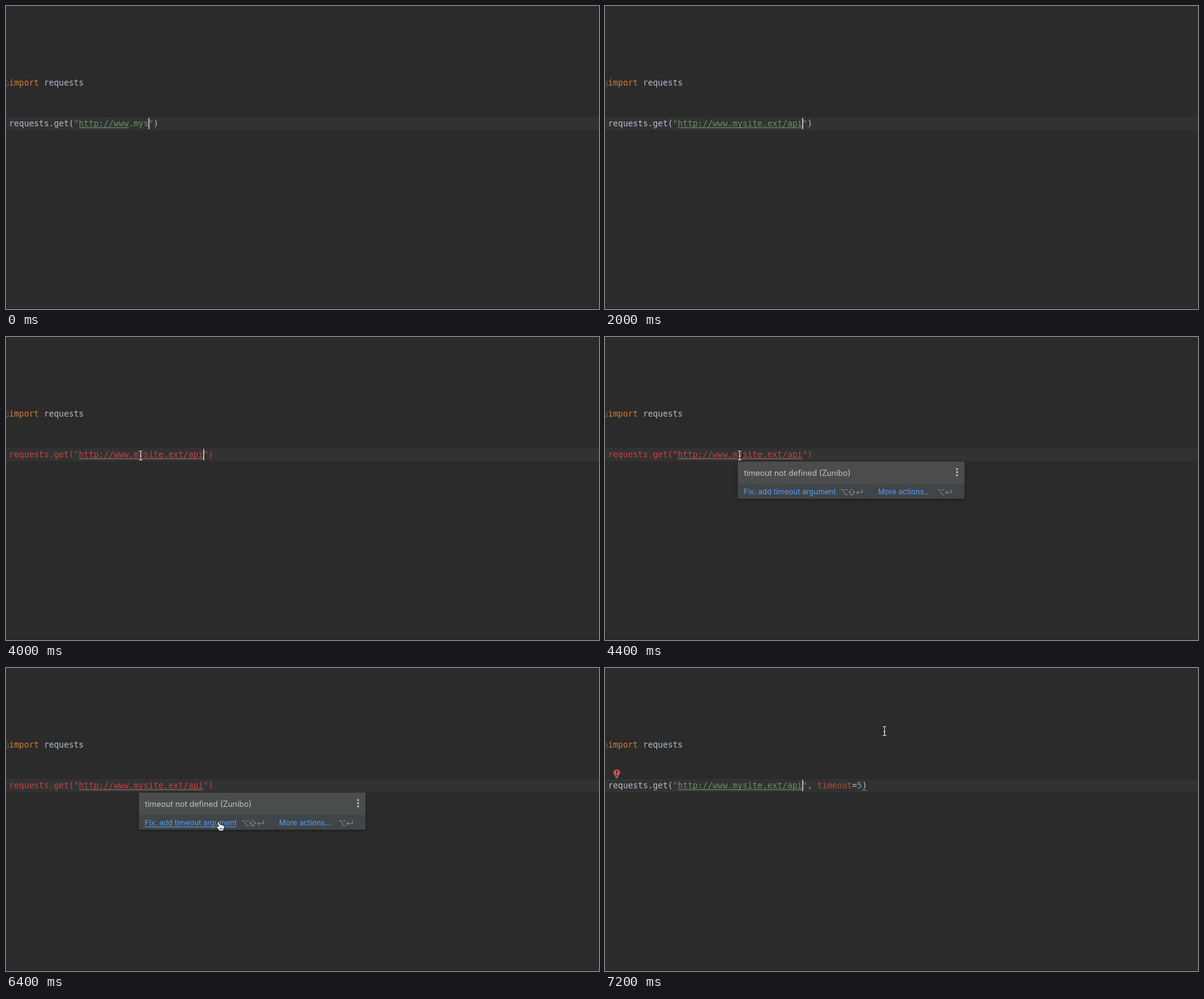
An HTML page for the animation above (7.4 s loop, 960 px wide and 491 px high).

```html
<!DOCTYPE html>
<html lang="en">
<head>
<meta charset="utf-8">
<style>
  html, body { margin: 0; width: 100%; height: 100%; overflow: hidden; background: #2b2b2b; }
  svg { display: block; width: 960px; height: 491px; }
  text { white-space: pre; }
  .code { font: 13.4px "DejaVu Sans Mono", "Noto Sans Mono", monospace; font-variant-ligatures: none; }
  .ui { font-family: Inter, "Open Sans", sans-serif; }
  .link { font-size: 12.08px; fill: #589df6; }
  .keys { fill: none; stroke: #8f9496; stroke-linejoin: round; }
</style>
</head>
<body>
<svg viewBox="0 0 960 491" xmlns="http://www.w3.org/2000/svg">
  <defs>
    <filter id="shade" x="-10%" y="-30%" width="120%" height="170%">
      <feDropShadow dx="0" dy="2" stdDeviation="3" flood-color="#000" flood-opacity=".35"/>
    </filter>
    <path id="option" d="M0 1.5H3L7 9.5H10.5M6.5 1.5H10.5"/>
    <path id="shift" d="M5 .5L10 5.5H7.5V9.5H2.500V5.500H0Z"/>
    <path id="enter" d="M10.5 1V6H1M4 3L1 6L4 9"/>
    <path id="ibeam" d="M-3-7.500Q0-7.500 0-5.500Q0-7.500 3-7.500M0-6V6M-3 7.500Q0 7.500 0 5.500Q0 7.500 3 7.500M-1.800 1H1.800"/>
  </defs>

  <rect width="960" height="491" fill="#2b2b2b"/>
  <rect y="180" width="960" height="21.5" fill="#323232"/>
  <rect y="490" width="960" height="1" fill="#1f2020"/>
  <path d="M0 119.5L3.500 123V129.500H0M0 125.500H1.500" fill="none" stroke="#606366"/>
  <text class="code" x="5" y="129" fill="#afbdcc"><tspan fill="#d07d38">import</tspan> requests</text>

  <text class="code" id="line" x="5" y="195.2"></text>
  <rect id="under" x="118" y="196.6" height="1.1"/>
  <path id="wave" d="M416 199l2-2l2 2l2-2l2 2" fill="none" stroke="#8d9372"/>
  <rect id="caret" y="181.5" width="1.800" height="18" fill="#c0c0c0"/>

  <g id="bulb">
    <path d="M19 164.200a5.300 5.300 0 0 1 3 9.700l-.5 1.300h-5l-.5-1.300a5.300 5.300 0 0 1 3-9.700Z" fill="#d05150"/>
    <path d="M19 166V170.500M19 172V173.800" stroke="#2b2b2b" stroke-width="1.900"/>
    <path d="M16.500 176.300H21.500M17.300 178H20.700" stroke="#9a9da0" stroke-width="1.100"/>
  </g>

  <g id="popup">
    <rect x="215" y="202" width="367" height="60" fill="#4b4d4d" filter="url(#shade)"/>
    <rect x="215" y="238" width="367" height="24" fill="#3f4548"/>
    <text class="ui" x="225" y="224.5" font-size="12.8" fill="#bfc1c2">timeout not defined (Zunibo)</text>
    <g fill="#b4b7b9">
      <circle cx="570" cy="214" r="1.700"/><circle cx="570" cy="219" r="1.700"/><circle cx="570" cy="224" r="1.700"/>
    </g>
    <text class="ui link" x="224.5" y="255">Fix: add timeout argument</text>
    <text class="ui link" x="442" y="255">More actions...</text>
    <rect id="fixLine" x="224.5" y="257" width="148" height="1" fill="#589df6"/>
    <rect id="moreLine" x="442" y="257" width="84" height="1" fill="#589df6"/>
    <g class="keys">
      <use href="#option" x="382.5" y="246"/><use href="#shift" x="394.5" y="246"/><use href="#enter" x="406" y="246"/>
      <use href="#option" x="539" y="246"/><use href="#enter" x="550.5" y="246"/>
    </g>
  </g>

  <g id="mouse">
    <g id="beam" fill="none">
      <use href="#ibeam" stroke="#151515" stroke-width="2.800"/>
      <use href="#ibeam" stroke="#f0f0f0" stroke-width="1.200"/>
    </g>
    <path id="arrow" d="M0 0V14.200L3.300 11.200L5.600 16.500L8 15.500L5.700 10.400H10.200Z" fill="#111" stroke="#fff" stroke-width="1.200" stroke-linejoin="round"/>
    <g id="hand">
      <path d="M-2.500 1Q-2.200-.8-.5 0Q.5.800 2 5Q3.300 4 4.300 5.200Q5.800 4.500 6.600 6Q8.500 5.500 8.900 7.500Q9.300 11 7.500 13V15H0V13.200Q-1.500 11.500-4 8.800Q-4.300 7 -2.500 7.300L-.4 8.500Z" fill="#fff" stroke="#111" stroke-linejoin="round"/>
      <path d="M2 10V13M4 10V13M6 10V13" stroke="#222" stroke-width=".8"/>
    </g>
  </g>
</svg>
<script>
const LOOP = 7400, STEP = 200, CHAR = 8.067, LEFT = 118;
const TYPED = 2200, POPUP = 4400, FIXED = 6600;
const URL_TEXT = "http://www.mysite.ext/api";
const PLAIN = "#afbdcc", GREEN = "#6f8d5e", RED = "#c54340";

// [time, letters typed] and [time, letters underlined]
const typed = [[0, 14], [200, 18], [800, 19], [1000, 21], [1200, 22], [1600, 24], [1800, 25]];
const linked = [[0, 10], [600, 18], [1000, 19], [1200, 21], [1400, 22], [2000, 25]];
// [time, x, y] of the pointer
const path = [
  [3400, 127, 237], [3600, 170, 215], [3800, 208, 196], [4000, 218, 192], [4400, 218, 192],
  [4600, 224, 199], [4800, 310, 228], [5000, 430, 252], [5200, 475, 258], [5400, 461, 256],
  [5800, 385, 252], [6200, 344, 249], [6600, 345, 249], [6800, 356, 236], [7000, 415, 158], [7200, 452.5, 102]
];

const $ = id => document.getElementById(id);
const show = (id, on) => $(id).setAttribute("visibility", on ? "visible" : "hidden");
const latest = (list, t) => list.filter(k => k[0] <= t).pop()[1];

function pointer(t) {
  const i = path.findIndex(k => k[0] > t);
  if (i < 0) return path[path.length - 1].slice(1);
  if (i === 0) return path[0].slice(1);
  const [a, b] = [path[i - 1], path[i]];
  const p = (t - a[0]) / (b[0] - a[0]);
  return [a[1] + (b[1] - a[1]) * p, a[2] + (b[2] - a[2]) * p];
}

function setLine(parts) {
  $("line").replaceChildren(...parts.map(([text, fill]) => {
    const span = document.createElementNS("http://www.w3.org/2000/svg", "tspan");
    span.textContent = text;
    span.setAttribute("fill", fill);
    return span;
  }));
}

// steady around edits, otherwise a half-second blink refreshed every two steps
function caretOn(t) {
  const beat = Math.floor(t / (2 * STEP)) * 2 * STEP;
  return t <= TYPED || t >= FIXED || Math.floor((beat - TYPED) / 500) % 2 === 1;
}

function draw(t) {
  const count = latest(typed, t);
  const bad = t >= 2800 && t < 6800;
  const open = t >= POPUP && t < FIXED;
  const tint = color => bad ? RED : color;

  const parts = [["requests.get(", tint(PLAIN)], ['"' + URL_TEXT.slice(0, count) + '"', tint(GREEN)]];
  if (t >= FIXED) parts.push([", ", tint("#d07d38")], ["timeout", tint("#b64c30")], ["=", tint(PLAIN)], ["5", tint("#6b9cc2")]);
  parts.push([")", tint(PLAIN)]);
  setLine(parts);

  $("under").setAttribute("width", latest(linked, t) * CHAR);
  $("under").setAttribute("fill", bad ? "#a5707c" : "#6b9382");

  show("caret", caretOn(t));
  $("caret").setAttribute("x", LEFT + count * CHAR - .5);
  show("wave", t >= 7000);
  show("bulb", t >= 7000);

  const [x, y] = pointer(t);
  const over = (a, b) => open && x >= a && x <= b && y > 243 && y < 256;
  const onFix = over(224, 374), onMore = over(442, 526);
  const inside = open && x > 215 && x < 582 && y > 202;
  const seen = t >= path[0][0];
  $("popup").setAttribute("display", open ? "inline" : "none");
  $("fixLine").setAttribute("display", onFix ? "inline" : "none");
  $("moreLine").setAttribute("display", onMore ? "inline" : "none");
  $("mouse").setAttribute("transform", `translate(${x} ${y})`);
  show("hand", seen && (onFix || onMore));
  show("arrow", seen && inside && !onFix && !onMore);
  show("beam", seen && !inside);
}

const start = performance.now();
function tick() {
  const t = (performance.now() - start) % LOOP;
  draw(Math.floor(t / STEP) * STEP);
  requestAnimationFrame(tick);
}
tick();
</script>
</body>
</html>
```
